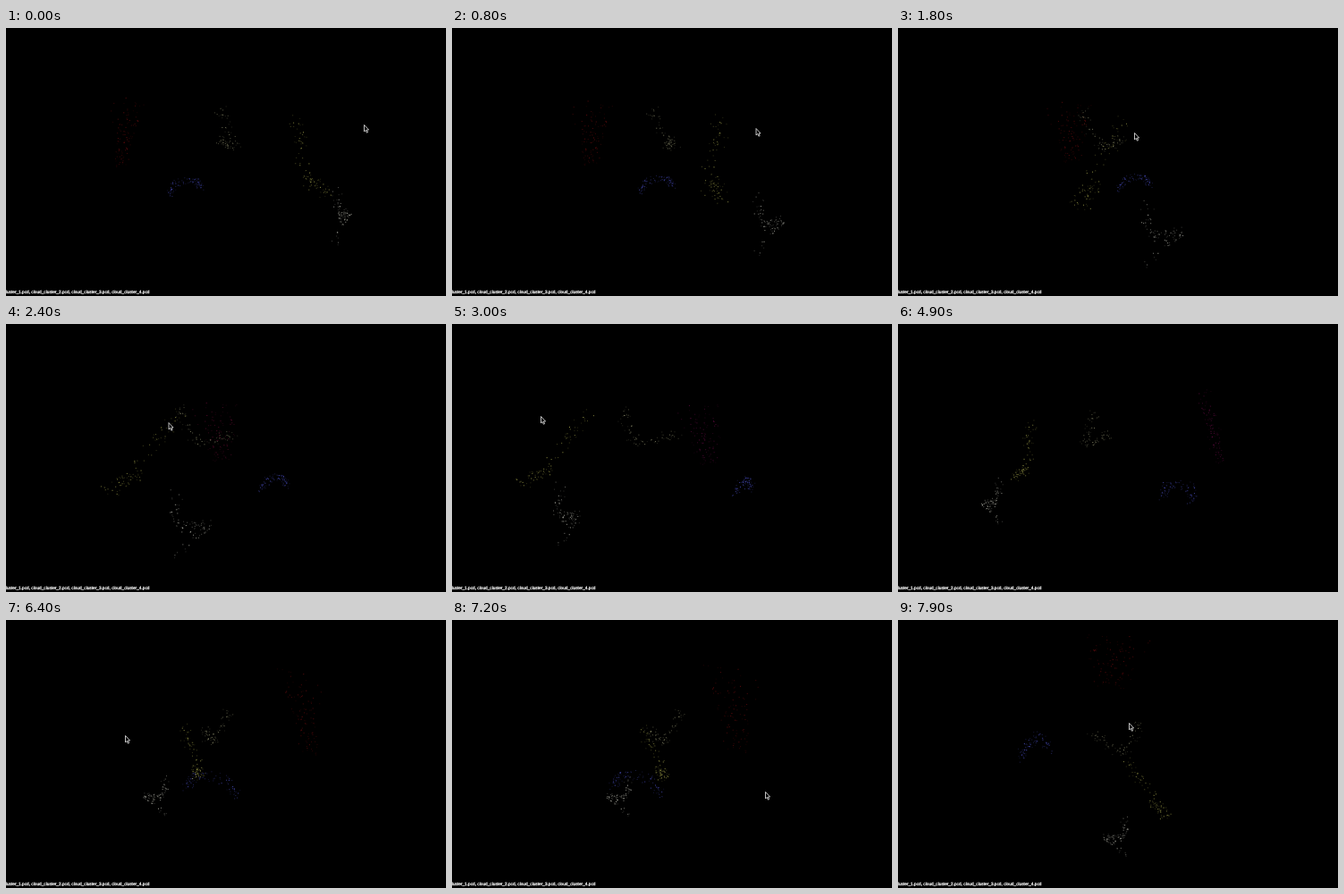
Write an HTML page with a canvas that moves like this. It is 492x300 px and loops after 8000 ms.

```html
<!DOCTYPE html>
<html lang="en">
<head>
<meta charset="utf-8">
<title>Point cloud viewer</title>
<style>
  html, body { margin: 0; width: 100%; height: 100%; overflow: hidden; background: #000; }
  canvas, svg { position: absolute; left: 0; top: 0; width: 492px; height: 300px; }
  text { font: 4.76px "Liberation Sans", Arial, sans-serif; fill: #fff; stroke: #fff; stroke-width: .25px; text-anchor: end; text-rendering: geometricPrecision; }
</style>
</head>
<body>
<canvas id="view" width="492" height="300"></canvas>
<svg viewBox="0 0 492 300">
  <text x="160.4" y="296.6">cloud_cluster_0.pcd, cloud_cluster_1.pcd, cloud_cluster_2.pcd, cloud_cluster_3.pcd, cloud_cluster_4.pcd</text>
  <path id="cursor" d="M.5 .5V8L2.1 6.4 3.4 9.2 4.6 8.6 3.4 6H5.6Z" fill="#000" stroke="#eee" stroke-width=".8"/>
</svg>
<script>
const LOOP = 8000, STEP = 100, FOCAL = 460, CX = 235, CY = 150;
const START_TURN = 162, TURN_RATE = 0.335, TILT_RATE = 0.33; // degrees per dragged pixel
const ctx = document.getElementById('view').getContext('2d');
const cursor = document.getElementById('cursor');

// Mouse drags that orbit the camera, as [time, x, y]
const drags = [
  [[0, 400, 108], [1800, 264, 117], [3000, 99, 103], [3600, 66, 105], [4100, 5.5, 106], [4900, -84, 108]],
  [[5200, 267, 139], [6400, 133, 129], [7000, 100, 127]],
  [[7200, 350, 192], [7900, 258, 115]]
];

// Each cluster scatters its points around a 3D path
const clusters = [
  { tint: [125, 16, 18], count: 100, spread: 5, depth: [46, 20], path: [[106, -74, -2], [125, 4, -2]] },
  { tint: [80, 85, 205], count: 84, spread: 6, depth: [7, 7], path: [[83, 44, -56], [78, 28, -66], [55, 24, -82], [48, 38, -88]] },
  { tint: [150, 150, 115], count: 70, spread: 8, depth: [9, 9], path: [[-17, -54, 38], [-27, -17, 20], [3, -24, -18]] },
  { tint: [180, 180, 85], count: 92, spread: 7, depth: [14, 12], path: [[-91, -42, 32], [-106, 12, 68], [-124, 28, 86]] },
  { tint: [210, 210, 198], count: 84, spread: 6, depth: [8, 4], path: [[-128, 22, 34], [-135, 54, 26], [-140, 52, 3], [-129, 78, 28]] }
];
const red = clusters[0], plum = [110, 14, 75];

let seed = 71;
function rand() {
  seed = (seed * 16807) % 2147483647;
  return seed / 2147483647;
}
const jitter = r => (rand() + rand() - 1) * r;
const mix = (a, b, k) => a + (b - a) * k;
const mixAll = (a, b, k) => a.map((v, i) => mix(v, b[i], k));

function scatter(cluster) {
  const { count, spread, depth, path } = cluster;
  return Array.from({ length: count }, () => {
    const k = rand(), s = k * (path.length - 1), i = Math.floor(s);
    const [x, y, z] = mixAll(path[i], path[i + 1], s - i);
    return {
      cluster,
      x: x + jitter(spread),
      y: y + jitter(spread),
      z: z + jitter(mix(...depth, k)),
      glow: 0.2 + 0.65 * rand() ** 2
    };
  });
}
const points = clusters.flatMap(scatter);

function along(keys, t) {
  let i = 1;
  while (i < keys.length - 1 && keys[i][0] < t) i++;
  const a = keys[i - 1], b = keys[i];
  const k = Math.max(0, Math.min(1, (t - a[0]) / (b[0] - a[0])));
  return mixAll(a, b, k).slice(1);
}

// The camera keeps the sum of all drags so far
function pose(t) {
  let turn = START_TURN, tilt = 0, mouse;
  for (const drag of drags) {
    if (t < drag[0][0]) break;
    mouse = along(drag, t);
    turn += (mouse[0] - drag[0][1]) * TURN_RATE;
    tilt -= (mouse[1] - drag[0][2]) * TILT_RATE;
  }
  return { turn: turn * Math.PI / 180, tilt: tilt * Math.PI / 180, mouse };
}

function draw(t) {
  const { turn, tilt, mouse } = pose(t);
  const ca = Math.cos(turn), sa = Math.sin(turn), cp = Math.cos(tilt), sp = Math.sin(tilt);
  const shift = Math.max(0, Math.min(1, (1900 - Math.abs(t - 3950)) / 500));
  const redNow = mixAll(red.tint, plum, shift);

  ctx.globalAlpha = 1;
  ctx.fillStyle = '#000';
  ctx.fillRect(0, 0, 492, 300);
  for (const { cluster, x, y, z, glow } of points) {
    const side = x * ca - z * sa, depth = x * sa + z * ca;
    const scale = FOCAL / (FOCAL + depth * cp - y * sp);
    const rgb = cluster === red ? redNow : cluster.tint;
    ctx.fillStyle = `rgb(${rgb.map(Math.round)})`;
    ctx.globalAlpha = glow;
    ctx.fillRect(CX + side * scale - 0.5, CY + (y * cp + depth * sp) * scale - 0.5, 1, 1);
  }
  cursor.setAttribute('transform', `translate(${mouse})`);
}

const start = performance.now();
function tick() {
  const t = (performance.now() - start) % LOOP;
  draw(Math.floor(t / STEP) * STEP);
  requestAnimationFrame(tick);
}
tick();
</script>
</body>
</html>
```
